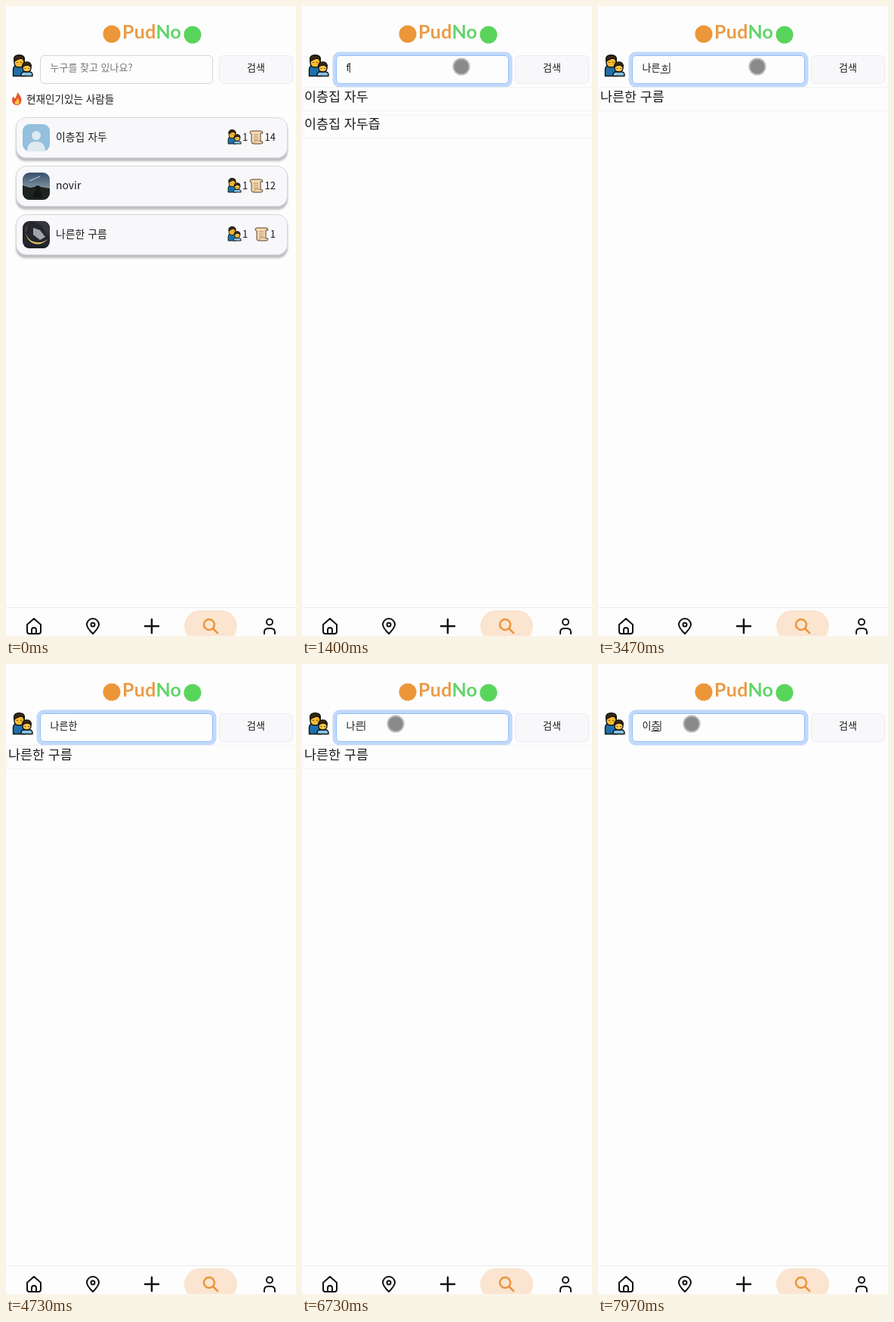
Recreate the animation shown at these times as an HTML page. Size 384 by 832 pixels, loop 8000 ms.

```html
<!DOCTYPE html>
<html lang="ko">
<head>
<meta charset="utf-8">
<title>Search</title>
<style>
  html, body { margin: 0; width: 100%; height: 100%; overflow: hidden; background: #fdfdfd; }
  svg { display: block; width: 100%; height: 100%; }
  text { font: 13px "Noto Sans CJK KR", "Noto Sans CJK", "Noto Sans", sans-serif; fill: #1c1c1e; white-space: pre; }
  .name { font-size: 13.9px; }
  .hit { font-size: 17.4px; }
  .small { font-size: 11px; text-anchor: middle; }
  .line { fill: none; stroke: #111; stroke-width: 2; stroke-linecap: round; stroke-linejoin: round; }
  .box { fill: #f8f8fa; stroke: #d6d6da; }
</style>
</head>
<body>
<svg viewBox="0 0 384 832" preserveAspectRatio="none">
  <defs>
    <filter id="soft" x="-10%" y="-20%" width="120%" height="150%"><feGaussianBlur stdDeviation="1.3"/></filter>
    <linearGradient id="night" x2="0" y2="1">
      <stop offset="0" stop-color="#1f2128"/><stop offset=".35" stop-color="#3a4050"/><stop offset=".65" stop-color="#566078"/>
    </linearGradient>
    <linearGradient id="dusk" x2="0" y2="1">
      <stop offset="0" stop-color="#34506e"/><stop offset=".6" stop-color="#8495a2"/>
    </linearGradient>
    <clipPath id="square"><rect width="36" height="36" rx="9"/></clipPath>
    <clipPath id="round"><circle cx="18" cy="18" r="18"/></clipPath>
    <clipPath id="photoClip"><rect x="26" y="168" width="131" height="131" rx="8"/></clipPath>

    <symbol id="people" viewBox="0 0 28 30">
      <g stroke="#151510" stroke-width="1.400" stroke-linejoin="round">
        <path d="M1.500 28.500V20q0-5 5-5h7q4 0 4 4v9.500z" fill="#1b70ad"/>
        <path d="M3 7q0-6 6.500-6T16 7v4q0 6-6.500 6T3 11z" fill="#f9b934"/>
        <path d="M3 9Q1 1 9.500 1T16 9q-1-4-5-4-4 1-8 4z" fill="#3d2a18"/>
        <path d="M12 28.500V27q0-4 4-4h7q4 0 4 4v1.500z" fill="#86c3ec"/>
        <path d="M14 16q0-5 5.500-5t5.500 5v2q0 5-5.500 5T14 18z" fill="#fbc548"/>
        <path d="M14 16.500q-1-6.500 5.500-6.500t5.500 6.500q-2-2.500-5-2.500t-6 2.500z" fill="#3d2a18"/>
      </g>
      <path d="M7 10v1M12 10v1M17.500 18v1M22 18v1" stroke="#151510" stroke-width="1.300"/>
    </symbol>
    <symbol id="scroll" viewBox="0 0 19 19">
      <path d="M4 1h11q3 0 3 3h-3v11q3-1 3 1 0 2-3 2H6q-3 0-3-3V5Q1 5 1 3t3-2z" fill="#f3d9b4" stroke="#5a4028"/>
      <path d="M6 6h6M6 9h6M6 12h6M6 17q2-1 1-3h9" fill="none" stroke="#a98358" stroke-width=".9"/>
    </symbol>
    <g id="moon">
      <rect width="36" height="36" fill="#25262e"/>
      <path d="M14 0h22v22L24 6z" fill="#343640"/>
      <path d="M9 3a16 16 0 1 0 24 21A15 13 0 0 1 9 3z" fill="#e3c865"/>
      <path d="M14 9l9 3 7 9-7 4-9-7z" fill="#a2a4a8"/>
      <path d="M0 32h36v4H0z" fill="#1d2026"/>
    </g>
  </defs>

  <rect width="384" height="832" fill="#fdfdfd"/>

  <circle cx="140" cy="37" r="11.500" fill="#ec963a"/>
  <circle cx="247" cy="38" r="11.500" fill="#5ad55c"/>
  <text x="154" y="42.500" style="font:700 25px Lato,sans-serif;letter-spacing:.3px;fill:#ea9c48">Pud<tspan fill="#62d568">No</tspan></text>

  <use href="#people" x="8" y="64" width="28" height="30"/>
  <rect id="ring" x="43" y="63" width="233" height="42" rx="7" fill="none" stroke="#c2d9fb" stroke-width="5"/>
  <rect id="field" x="45.500" y="65.500" width="228" height="37" rx="5.500" fill="#fdfdfd"/>
  <text id="typed" x="58.500" y="86"></text>
  <path id="underline" stroke="#222"/>
  <path id="caret" stroke="#111"/>
  <rect x="282.500" y="65.500" width="97" height="37" rx="5.500" class="box" style="stroke:#ececf0"/>
  <text x="331" y="86" text-anchor="middle">검색</text>

  <g id="cards">
    <path d="M15 114q5 5 5.500 10Q20 131 14.500 131 8 131 8 124q0-3 2-5 0 3 2 3 3-4 3-8z" fill="#e8552b"/>
    <path d="M15 121q3 4 2.500 6-.5 3-3 3-3 0-3-3 1-1 2-1 1-2 1.500-5z" fill="#ffcb3d"/>
    <text x="27" y="127.500" style="font-size:13.600px">현재인기있는 사람들</text>
  </g>
  <g id="hits"></g>

  <g id="profile">
    <rect x="13" y="117" width="360" height="199" rx="11" fill="#b9bcc4" filter="url(#soft)"/>
    <rect x="13.500" y="114.500" width="358" height="196" rx="10" fill="#f8f8fa" stroke="#b9d5f8" stroke-width="3"/>
    <text x="58" y="143" class="name">나른한 구름</text>
    <use href="#people" x="200" y="182" width="17" height="19"/>
    <text x="208" y="215" class="small">1</text>
    <path d="M203 252h12q2 0 2 2v8q0 2-2 2h-7l-4 3v-3h-1q-2 0-2-2v-8q0-2 2-2z" class="line" style="stroke-width:1.300"/>
    <path d="M205 258h.1M209 258h.1M213 258h.1" class="line"/>
    <text x="208" y="282" class="small">2</text>
    <g id="photo">
      <g transform="translate(24 124) scale(.944)" clip-path="url(#round)"><use href="#moon"/></g>
      <g clip-path="url(#photoClip)">
        <rect x="26" y="168" width="131" height="131" fill="url(#night)"/>
        <path d="M26 168h131v20q-70-10-131-4z" fill="#1c1d20"/>
        <path d="M26 245l40-4 45 5v36H26z" fill="#2e333c"/>
        <g id="lights" fill="#e4e8ec"></g>
        <path d="M157 172q-30 2-50 4-28 6-28 24 6 6 0 18 0 14 16 20 12 8 18 22l44 16z" fill="#3d1714"/>
        <path d="M157 186q-30-8-48 6-14 12-6 24 14 10 26 6 8 12 28 6z" fill="#651d18"/>
        <path d="M110 254q20-6 47-6v26h-47z" fill="#2b1a15"/>
        <path d="M26 280q70-10 131-12v33H26z" fill="#7c6a48"/>
        <path d="M26 276q80-6 131-14v16q-70 2-131 10z" fill="#a8742f"/>
        <path d="M26 289q70-10 131-1v12H26z" fill="#8f8a80"/>
        <path d="M100 242h2.500v34H100zM94 240h13v3H94zM94 257h13v7H94z" fill="#d8452a"/>
      </g>
    </g>
  </g>

  <path d="M0 794.500h384" stroke="#ececec"/>
  <rect x="236" y="798" width="70" height="42" rx="21" fill="#fbe5d0"/>
  <g class="line">
    <path d="M28 817l9-8 9 8v9q0 3-3 3H31q-3 0-3-3zM34 829v-5q0-3 3-3t3 3v5"/>
    <path d="M115 829q-8-8-8-12a8 8 0 0 1 16 0q0 4-8 12z"/><circle cx="115" cy="817" r="2.500"/>
    <path d="M184 819h18M193 810v18" stroke-width="2.500"/>
    <g stroke="#ec943c" stroke-width="2.500"><circle cx="269" cy="817" r="7"/><path d="M274 822l6 6"/></g>
    <circle cx="349" cy="813.500" r="4"/><path d="M342 829v-2q0-5 5-5h4q5 0 5 5v2"/>
  </g>

  <circle id="touch" r="10.500" fill="#8a8a8c" stroke="#b8b8ba" stroke-width="2"/>
</svg>
<script>
const LOOP = 8000;
const $ = id => document.getElementById(id);
const show = (id, on) => { $(id).style.display = on ? "" : "none"; };
const clamp = v => Math.max(0, Math.min(1, v));
const latest = (track, t) => track.findLast(step => step[0] <= t) || track[0];

const avatars = [
  `<rect width="36" height="36" fill="#94bfde"/><circle cx="18" cy="15" r="6" fill="#dfe9f0"/><path d="M6 36q0-13 12-13t12 13z" fill="#dfe9f0"/>`,
  `<rect width="36" height="36" fill="url(#dusk)"/><path d="M0 17l10 3 9-2 17 3v15H0z" fill="#1d241f"/><path d="M9 11l14-6" stroke="#c9d2da"/><circle cx="20" cy="20" r="3" fill="#141518"/><path d="M14 33q0-10 6-10t6 10z" fill="#141518"/>`,
  `<use href="#moon"/>`
];
const people = [["이층집 자두", 14, 322], ["novir", 12, 322], ["나른한 구름", 1, 329]];

$("cards").innerHTML += people.map(([name, posts, scrollX], i) => `
  <g transform="translate(0 ${i * 64})">
    <rect x="13" y="151" width="360" height="54" rx="13" fill="#bfbfc4" filter="url(#soft)"/>
    <rect x="13.500" y="147.500" width="359" height="53" rx="13" class="box"/>
    <g transform="translate(22 156)" clip-path="url(#square)">${avatars[i]}</g>
    <text x="66" y="178" class="name">${name}</text>
    <use href="#people" x="293" y="163" width="19" height="20"/>
    <text x="313" y="178">1</text>
    <use href="#scroll" x="${scrollX}" y="164" width="19" height="19"/>
    <text x="357" y="178" text-anchor="end">${posts}</text>
  </g>`).join("");

$("lights").innerHTML = Array.from({ length: 90 }, (_, i) =>
  `<rect x="${26 + i * 29 % 83}" y="${246 + i * i * 7 % 19}" width="${1 + i % 4}" height="1.500"/>`).join("");

const hitRows = names => names.map((name, i) => `
  <rect x="2.500" y="${107.5 + i * 36}" width="390" height="31" fill="none" stroke="#f4f4f2"/>
  <text x="3" y="${126 + i * 36}" class="hit">${name}</text>`).join("");
const hitLists = { pair: ["이층집 자두", "이층집 자두즙"], single: ["나른한 구름"] };

const scenes = [[0, "cards"], [1000, ""], [1200, "pair"], [1600, ""], [1770, "cards"], [2570, ""],
  [2850, "single"], [4900, "profile"], [6730, "single"], [7050, ""], [7450, "pair"], [7900, ""]];

// time, text, whether the last syllable is still being composed
const typing = [[0, ""], [1000, "f"], [1600, ""], [2570, "ㄴ", 1], [2700, "나", 1], [2950, "나ㄹ", 1],
  [3080, "나르", 1], [3220, "나른", 1], [3360, "나른ㅎ", 1], [3480, "나른하", 1], [3620, "나른한", 1],
  [4200, "나른한"], [5700, "나른한"], [6720, "나른"], [6890, "나"], [7050, ""], [7200, "ㅇ", 1],
  [7350, "이", 1], [7620, "이ㅊ", 1], [7760, "이츠", 1], [7900, "이층", 1]];

const focus = [[0, 0], [450, 1], [4830, 0], [5700, 1]];
const RING_DELAY = 250;
// appears, disappears, x, y
const touches = [[300, 4000, 211, 80], [4780, 5250, 330, 82], [5480, 8100, 124, 79]];

let hitsShown;
function draw(t) {
  const scene = latest(scenes, t)[1];
  show("cards", scene === "cards");
  show("profile", scene === "profile");
  show("photo", t >= 5100);
  if (hitsShown !== scene) {
    $("hits").innerHTML = hitRows(hitLists[scene] || []);
    hitsShown = scene;
  }

  const [changed, value, composing] = latest(typing, t);
  const [focusTime, focused] = latest(focus, t);
  const typed = $("typed");
  typed.textContent = value || "누구를 찾고 있나요?";
  typed.style.fill = value ? "" : "#75757a";
  const end = 58.5 + (value ? typed.getComputedTextLength() : 0);
  const caretOn = focused && (t - Math.max(changed, focusTime)) % 1000 < 500;
  $("caret").setAttribute("d", caretOn ? `M${end + .5} 75v13` : "");
  $("underline").setAttribute("d", composing ? `M${end - 12} 88.500h12` : "");

  const ease = clamp((t - focusTime - RING_DELAY) / 150);
  const ring = focusTime ? (focused ? ease : 1 - ease) : 0;
  $("ring").style.opacity = ring;
  $("field").style.stroke = `color-mix(in srgb, #8fbdf8 ${ring * 100}%, #d2d5da)`;

  const touch = touches.find(([from, to]) => t >= from && t < to);
  show("touch", touch);
  if (touch) {
    const [from, to, x, y] = touch;
    $("touch").setAttribute("transform", `translate(${x} ${y})`);
    $("touch").style.opacity = Math.min(clamp((t - from) / 100), clamp((to - t) / 100));
  }
}

function tick() {
  draw(performance.now() % LOOP);
  requestAnimationFrame(tick);
}
tick();
</script>
</body>
</html>
```
